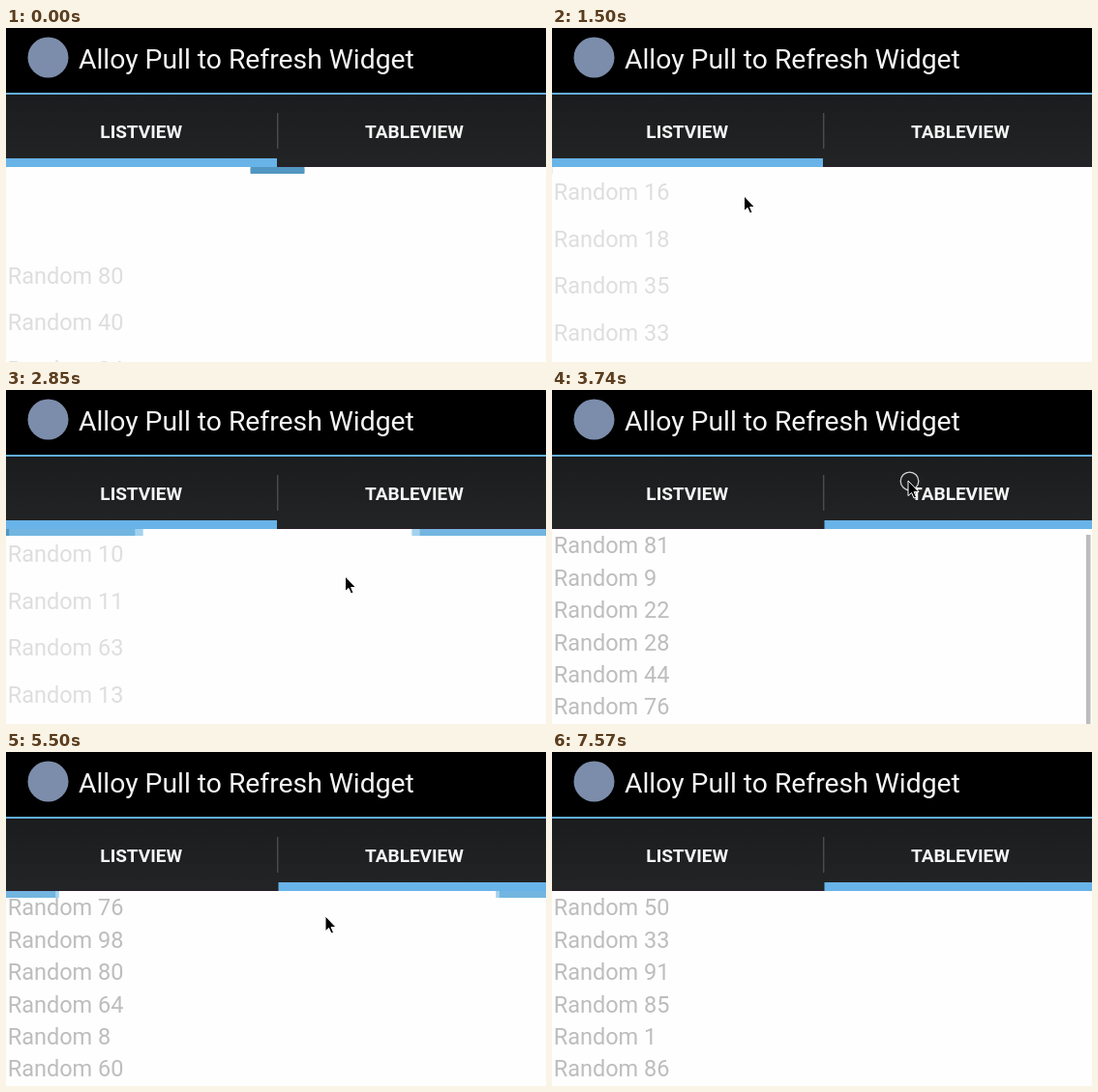
Animation, 558 px wide and 346 px high, one loop 7.79 s. Source, as an HTML page:

```html
<!DOCTYPE html>
<html lang="en">
<head>
<meta charset="utf-8">
<title>Pull to refresh</title>
<style>
html, body { margin: 0; width: 100%; height: 100%; overflow: hidden; background: #000; }
svg { display: block; font-family: Roboto, sans-serif; }
.tab { font-size: 19px; font-weight: 700; fill: #f5f5f5; text-anchor: middle; }
.row { font-size: 23.5px; }
</style>
</head>
<body>
<svg width="558" height="346" viewBox="0 0 558 346">
  <defs>
    <linearGradient id="tabs" x1="0" y1="0" x2="0" y2="1">
      <stop offset="0" stop-color="#1b1c1d"/><stop offset="1" stop-color="#232425"/>
    </linearGradient>
    <clipPath id="strip"><rect y="144" width="558" height="7"/></clipPath>
    <clipPath id="page"><rect y="144" width="558" height="202"/></clipPath>
  </defs>
  <rect width="558" height="346" fill="#fefefe"/>
  <g clip-path="url(#page)">
    <g id="list"></g>
    <rect id="thumb" x="552" y="150" width="4.5" height="420" fill="#bcbcbc"/>
  </g>
  <rect width="558" height="67" fill="#000"/>
  <circle cx="43.5" cy="30.5" r="21" fill="#7c8dab"/>
  <text x="75" y="42.3" font-size="28.3" fill="#f5f5f5">Alloy Pull to Refresh Widget</text>
  <rect y="69" width="558" height="75" fill="url(#tabs)"/>
  <rect y="67" width="558" height="2" fill="#62aee0"/>
  <rect y="143" width="558" height="1" fill="#2c1f2c"/>
  <rect x="280" y="88" width="1.4" height="37" fill="#4b4c4d"/>
  <rect id="mark" y="135" height="9" fill="#68b3e7"/>
  <text class="tab" x="139.7" y="114">LISTVIEW</text>
  <text class="tab" x="422" y="114">TABLEVIEW</text>
  <g clip-path="url(#strip)">
    <g id="bar">
      <rect y="144" width="558" height="7" fill="#5297c1"/>
      <circle id="wave2" cx="280.5" cy="147.5" fill="#72b5e0"/>
      <circle id="wave3" cx="280.5" cy="147.5" fill="#a3d2ee"/>
      <rect id="gap" y="144" height="7" fill="#fefefe"/>
    </g>
    <circle id="trigger" cx="280.5" cy="147.5" fill="#5297c1"/>
  </g>
  <g id="cursor">
    <circle id="click" cx="1.5" cy=".4" r="9.3" fill="none" stroke="#d4d4d4" stroke-width="1.3"/>
    <path d="M0 0V15.6L3.6 12.4L6 18L8.5 17L6.1 11.5H11Z" fill="#000" stroke="#fff" stroke-width="1"/>
  </g>
</svg>
<script>
const $ = id => document.getElementById(id);
const LOOP = 7790, MIDDLE = 280.5, PULL = 186;
const SWITCH = 3720, CLICK_END = 3870;
const RETURN = 385, RUN = 512, FINISH = 1000;

// A pull lasts `pull` ms and is released at `at`; the new rows appear then.
const refreshes = [
  { at: 30, pull: 56, rows: '16 18 35 33' },
  { at: 1990, pull: 150, rows: '10 11 63 13' },
  { at: 4458, pull: 100, rows: '76 98 80 64 8 60' },
  { at: 6028, pull: 380, rows: '50 33 91 85 1 86' }
];
const firstList = '80 40 34 71', firstTable = '81 9 22 28 44 76';

// Points the cursor reaches, with arrival times.
const stops = [
  { t: 1500, x: 198.5, y: 174 },
  { t: 2850, x: 350.5, y: 193 },
  { t: 3430, x: 368, y: 94 },
  { t: CLICK_END, x: 368, y: 94 },
  { t: 4160, x: 336, y: 166 },
  { t: 5490, x: 330, y: 170 }
];

const clamp = v => Math.max(0, Math.min(1, v));
const smooth = p => p * p * (3 - 2 * p);
const mix = (a, b, p) => a + (b - a) * p;
const set = (id, attrs) => { for (const k in attrs) $(id).setAttribute(k, attrs[k]); };
const show = (id, on) => set(id, { visibility: on ? 'visible' : 'hidden' });

// The picture advances in steps that get slightly shorter after three seconds.
const sample = t => t < 2992
  ? Math.floor(t / 150) * 150
  : 2992 + Math.floor((t - 2992) / 147.2) * 147.2;

// cubic-bezier(.4, 0, .2, 1)
function ease(x) {
  x = clamp(x);
  let lo = 0, hi = 1, s = 0.5;
  for (let i = 0; i < 24; i++) {
    s = (lo + hi) / 2;
    const u = 1 - s;
    if (1.2 * u * u * s + 0.6 * u * s * s + s ** 3 < x) lo = s; else hi = s;
  }
  return smooth(s);
}

function drawList(t, last, shift) {
  const table = t >= SWITCH;
  const fresh = last && (last.at > SWITCH) === table;
  const rows = fresh ? last.rows : table ? firstTable : firstList;
  const top = table ? 169.4 : 178.3, pitch = table ? 33.4 : 48.5;
  $('list').innerHTML = rows.split(' ').map((v, i) =>
    `<text class="row" x="1.7" y="${top + i * pitch + shift}">Random ${v}</text>`).join('');
  set('list', { fill: table ? '#bdbdbd' : '#dedede' });
  set('mark', { x: table ? 281.5 : 0, width: table ? 276.5 : 280 });
  set('thumb', { y: 150 + shift, opacity: table ? 1 - clamp((t - 4900) / 250) : 0 });
}

function drawBar(age, pulled) {
  const on = age < RUN + FINISH;
  show('bar', on);
  if (on) {
    const radius = ms => MIDDLE * ease(ms / 1000);
    const gap = radius(age - RUN);
    set('wave2', { r: radius(age) });
    set('wave3', { r: radius(age - 500) });
    set('gap', { x: MIDDLE - gap, width: 2 * gap });
  }
  set('trigger', { r: MIDDLE * (pulled / PULL) ** 3 });
}

// Hidden while pulling, the cursor then comes back from below the page.
function drawCursor(t, last, next) {
  const back = last ? last.at + 500 : Infinity;
  const i = stops.findIndex(s => s.t >= t);
  const to = stops[i < 0 ? stops.length - 1 : i];
  const away = t < back || (next ? t >= next.at - next.pull : true);
  show('cursor', !away);
  set('click', { opacity: t >= SWITCH && t < CLICK_END ? 1 : 0 });
  if (away) return;
  const here = stops.filter(s => s.t > back && s.t < t).pop();
  const from = here || { t: back, x: to.x + 16, y: 340 };
  // Without another stop before the next pull, stay in place.
  const goal = to.t < next.at ? to : from;
  const p = goal === from ? 0 : smooth(clamp((t - from.t) / (goal.t - from.t)));
  set('cursor', { transform: `translate(${mix(from.x, goal.x, p)} ${mix(from.y, goal.y, p)})` });
}

function draw(t) {
  const last = refreshes.filter(r => r.at <= t).pop();
  const next = refreshes.find(r => r.at > t);
  const age = last ? t - last.at : Infinity;
  const pulled = next ? PULL * clamp(1 - (next.at - t) / next.pull) : 0;
  drawBar(age, pulled);
  drawList(t, last, pulled || PULL * (1 - clamp(age / RETURN)) ** 4);
  drawCursor(t, last, next);
}

const begin = performance.now();
function frame() {
  draw(sample((performance.now() - begin) % LOOP));
  requestAnimationFrame(frame);
}
frame();
</script>
</body>
</html>
```
